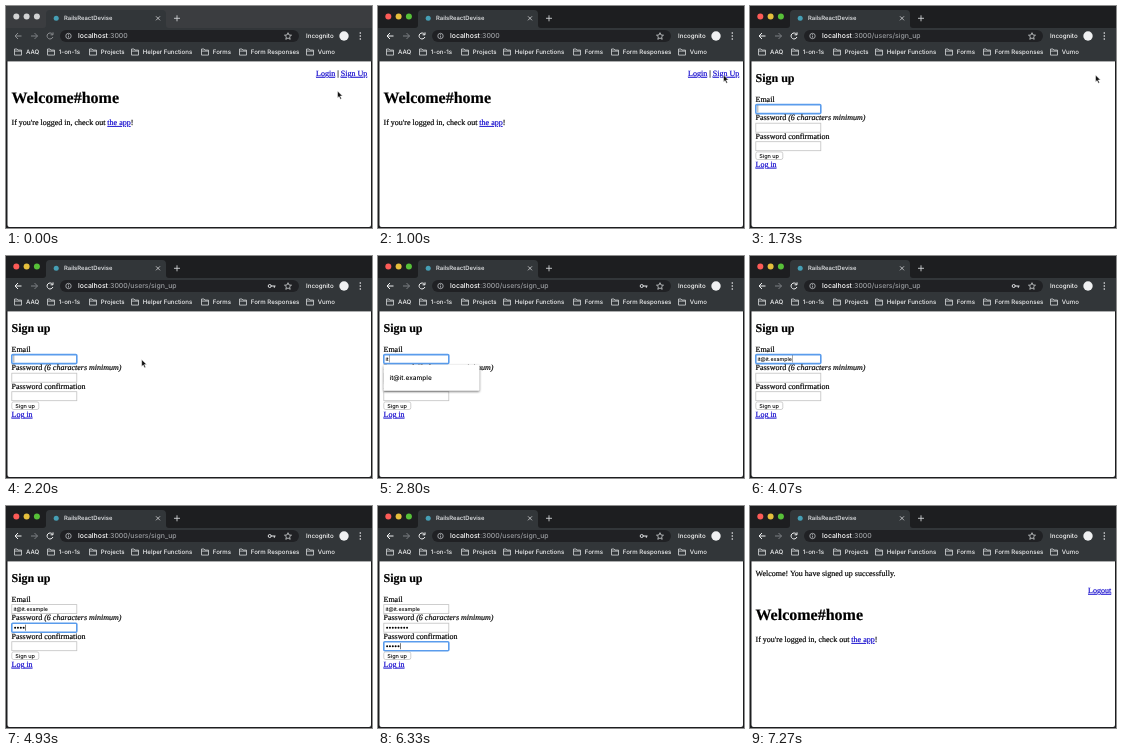
Write an HTML page that moves like this. It is 366x222 px and loops after 8 s.

```html
<!DOCTYPE html>
<html lang="en">
<head>
<meta charset="utf-8">
<title>Sign up demo</title>
<style>
html, body { margin: 0; width: 100%; height: 100%; overflow: hidden; background: #1d1e20; }
svg { display: block; width: 366px; height: 222px; text-rendering: geometricPrecision; }
text { white-space: pre; }
.ui { font-family: Inter, Roboto, sans-serif; font-weight: 500; }
.page { font-family: "Liberation Serif", "Times New Roman", serif; font-size: 8px; stroke: #000; stroke-width: .18px; }
.link { fill: #1006cc; stroke: #1006cc; text-decoration: underline; }
</style>
</head>
<body>
<svg id="stage" viewBox="0 0 366 222"></svg>
<script>
const LOOP = 8000, TICK = 1000 / 15;
const EMAIL = 'it@it.example';
const emailKeys = [2670, 2800, 2930, 3130, 3200, 3400, 3470, 3530, 3670, 3730, 3870, 3930, 4070];
const passKeys = [4530, 4670, 4730, 4930, 5070, 5200, 5270, 5400];
const confirmKeys = [5800, 5870, 5930, 6130, 6330, 6470, 6530, 6730];
const bookmarks = [[8, 'AAQ'], [41, '1-on-1s'], [83, 'Projects'], [125, 'Helper Functions'],
  [195, 'Forms'], [233, 'Form Responses'], [300, 'Vumo']];

const stage = document.getElementById('stage');
const count = (keys, t) => keys.filter(k => k <= t).length;
const rect = (x, y, w, h, fill, more = '') =>
  `<rect x="${x}" y="${y}" width="${w}" height="${h}" fill="${fill}" ${more}/>`;
const circle = (x, y, r, fill, more = '') => `<circle cx="${x}" cy="${y}" r="${r}" fill="${fill}" ${more}/>`;
const line = (d, color, w = 1) =>
  `<path d="${d}" fill="none" stroke="${color}" stroke-width="${w}" stroke-linejoin="round"/>`;
const ui = (x, y, size, fill, s) => `<text class="ui" x="${x}" y="${y}" font-size="${size}" fill="${fill}">${s}</text>`;
const serif = (x, y, s, more = '') => `<text class="page" x="${x}" y="${y}" ${more}>${s}</text>`;
const heading = (y, size, s) => serif(5.5, y, s, `style="font-size:${size}px" font-weight="700"`);
const link = s => `<tspan class="link">${s}</tspan>`;

function chrome(active, path, key) {
  const lights = active ? ['#fc5b57', '#e5bf3c', '#57c038'] : ['#d2d3d4', '#d2d3d4', '#d2d3d4'];
  const nav = active ? '#f0f1f2' : '#8b8e91';
  const folder = ([x, name]) =>
    line(`M${x + .5} 43h2.5l1 1.1h3.5v5h-7z M${x + .5} 45.1h7`, '#d4d6d8', .8) +
    ui(x + 12 - (x > 8 ? .2 : 0), 48, 6.1, '#f2f3f4', name);
  return rect(0, 0, 366, 22, active ? '#1d1e20' : '#3b3d40') +
    lights.map((c, i) => circle(10.3 + 10.3 * i, 10.6, 3, c)).join('') +
    `<path d="M37 22q3 0 3-3V8q0-4 4-4H156q4 0 4 4v11q0 3 3 3z" fill="#323639"/>` +
    circle(50.2, 12.2, 2.5, '#459fb5') +
    ui(58, 14.3, 5.9, '#eceef0', 'RailsReactDevise') +
    line('M150 10.3l4 4m0-4l-4 4', '#c4c6c8', .9) +
    line('M168 12.3h6m-3-3v6', '#d0d2d4', .9) +
    rect(0, 22, 366, 33.4, '#323639') +
    line('M15.5 30h-6.5m3-3l-3 3l3 3', nav) +
    line('M25 30h6.5m-3-3l3 3l-3 3', '#7d8084') +
    line('M46.5 28.2a3 3 0 1 0 .4 2.8M47 26.4v2.4h-2.4', nav) +
    rect(54, 24, 239, 12, '#202124', 'rx="6"') +
    circle(62.5, 30, 2.7, 'none', 'stroke="#b9bcbf" stroke-width=".8"') +
    line('M62.5 29.6v2M62.5 28.2v.8', '#b9bcbf', .8) +
    ui(72, 32.3, 6.9, '#fff', `localhost<tspan fill="#9a9da1">:3000${path}</tspan>`) +
    (key ? circle(263.7, 30, 1.5, 'none', 'stroke="#e0e2e4"') + line('M265 30h4.5m-1.2 0v1.8', '#e0e2e4') : '') +
    line('M282 26.7l1 2.3 2.5.2-1.9 1.6.6 2.5-2.2-1.3-2.2 1.3.6-2.5-1.9-1.6 2.5-.2z', '#d0d2d4', .8) +
    ui(300, 32.2, 6.2, '#fff', 'Incognito') +
    circle(338, 30, 4.7, '#f0f1f2') +
    [27, 30, 33].map(y => circle(354.3, y, .8, '#f0f1f2')).join('') +
    bookmarks.map(folder).join('');
}

function home(signedIn) {
  const dy = signedIn ? 17 : 0;
  return (signedIn ? serif(5.5, 70.1, 'Welcome! You have signed up successfully.') : '') +
    serif(361.2, 69.9 + dy, signedIn ? link('Logout') : `${link('Login')} | ${link('Sign Up')}`, 'text-anchor="end"') +
    heading(97 + dy, 16, 'Welcome#home') +
    serif(5.5, 119 + dy, `If you're logged in, check out ${link('the app')}!`);
}

function field(y, focused) {
  return rect(5.8, y, 65, 9, '#fff', focused
    ? 'rx="1" stroke="#5a9cec" stroke-width="1.6"'
    : 'stroke="#c2c2c2" stroke-width=".8"');
}

function dots(y, n, focused) {
  let s = '';
  for (let i = 0; i < n; i++) s += circle(9.1 + 2.85 * i, y + 4.6, 1, '#000');
  return s + (focused ? rect(7.8 + 2.85 * n, y + 1.5, .6, 6, '#222') : '');
}

function signUp(t) {
  const typed = count(emailKeys, t);
  const focus = t < 4270 ? 0 : t < 5670 ? 1 : 2;
  const caret = focus ? '' : '<tspan font-size="6" font-weight="300" dx="-.4">|</tspan>';
  const menu = typed && t < 4070
    ? rect(5.5, 108.7, 96, 26, '#fff', 'rx="1" style="filter:drop-shadow(0 1px 1.2px #0008)"') +
      ui(11.5, 123.5, 6.5, '#000', EMAIL)
    : '';
  return heading(76, 12, 'Sign up') +
    serif(5.5, 95.7, 'Email') + field(98.6, focus === 0) +
    ui(7.4, 104.8, 5.3, '#000', EMAIL.slice(0, typed) + caret) +
    serif(5.5, 114.3, 'Password <tspan font-style="italic">(6 characters minimum)</tspan>') +
    field(117.2, focus === 1) + dots(117.2, count(passKeys, t), focus === 1) +
    serif(5.5, 132.8, 'Password confirmation') +
    field(135.7, focus === 2) + dots(135.7, count(confirmKeys, t), focus === 2) +
    rect(5.8, 145.9, 27, 7.6, '#fff', 'rx="1.8" stroke="#bbb" stroke-width=".7"') +
    ui(9.2, 151.5, 5.5, '#000', 'Sign up') +
    serif(5.5, 160.7, link('Log in')) + menu;
}

function pointer(t) {
  if (t >= 2670) return '';
  const step = Math.floor((t + 4) / TICK);
  const part = (from, n) => Math.min(1, Math.max(0, (step - from + 1) / n));
  const a = part(3, 5), p = part(29, 9), q = 1 - p;
  const x = q * q * (331.5 + 14 * a) + 2 * p * q * 134 + p * p * 4;
  const y = q * q * (85 - 16 * a) + 2 * p * q * 54 + p * p * 205;
  return `<path transform="translate(${x} ${y})" d="M0 0v7l1.6-1.5 1.2 2.7 1.2-.5-1.2-2.7h2.2z"
    fill="#111" stroke="#fff" stroke-width=".5"/>`;
}

function scene(t) {
  const form = t >= 1400 && t < 7130;
  return rect(0, 0, 366, 222, '#1d1e20') +
    rect(1.5, 50, 363.5, 171, '#fff', 'rx="2"') +
    chrome(t >= 1000, form ? '/users/sign_up' : '', form && t >= 1930) +
    (form ? signUp(t) : home(t >= 7130)) + pointer(t);
}

const start = performance.now();
let last = '';
function draw() {
  const now = scene((performance.now() - start) % LOOP);
  if (now !== last) stage.innerHTML = last = now;
  requestAnimationFrame(draw);
}
draw();
</script>
</body>
</html>
```
